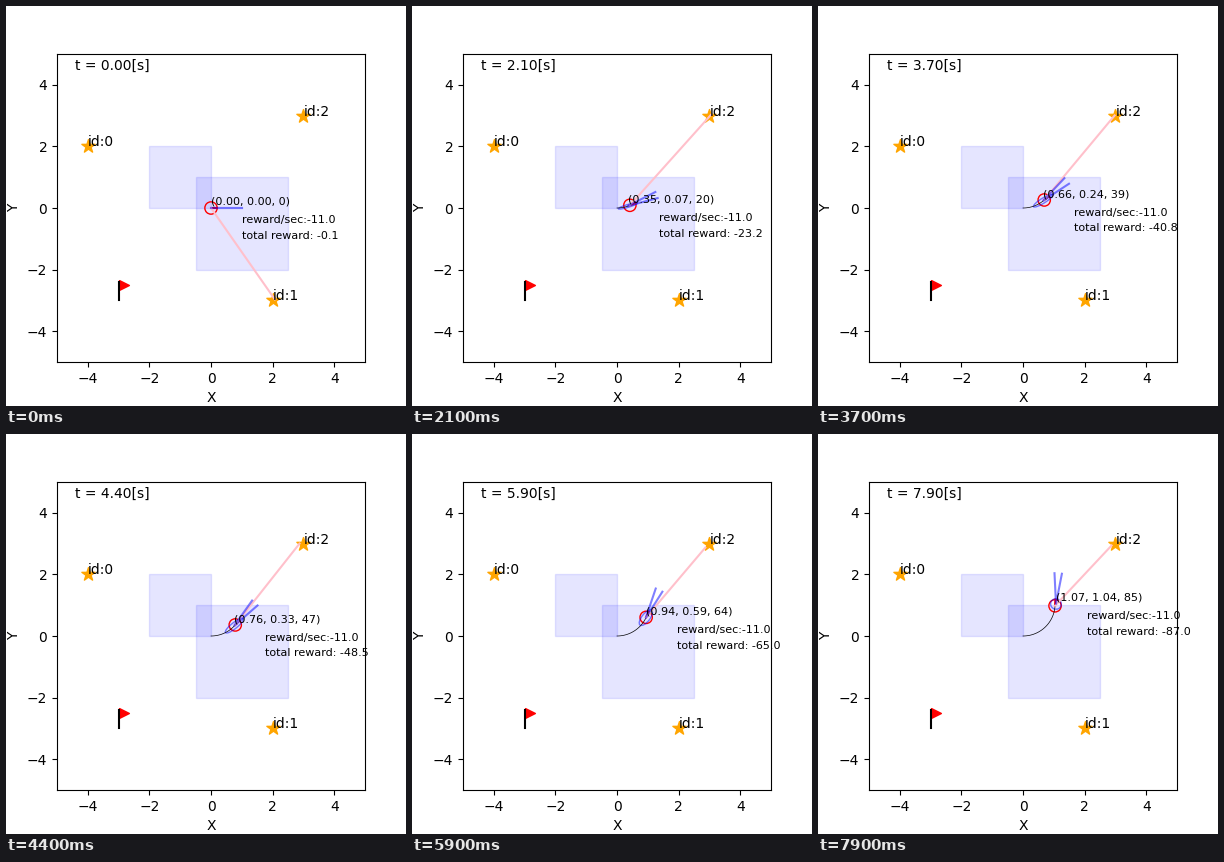
Recreate the animation shown at these times as a matplotlib script. Size 400 by 400 pixels, loop 8000 ms.

```python
import math
import random

import numpy as np
import matplotlib.pyplot as plt
from matplotlib.animation import FuncAnimation
from matplotlib.patches import Circle, Ellipse, Rectangle

STEPS, DT = 80, 0.1
SPEED, TURN = 0.2, math.radians(11)
LANDMARKS = [(-4, 2), (2, -3), (3, 3)]
PUDDLES = [((-2, 0), 2, 2), ((-0.5, -2), 3, 3)]
VIEW, MISS_RATE = math.pi / 3, 0.175


def arc(t, shift, lean=1.0):
    """Point on the planned arc, moved by shift along a share of its heading."""
    r, a = SPEED / TURN, TURN * t
    return (r * np.sin(a) + shift * np.cos(lean * a),
            r * (1 - np.cos(a)) + shift * np.sin(lean * a))


def robot(t):
    return arc(t, 0.013 * np.sin(np.pi * t / 7))


def belief(t):
    """Estimated x, y and heading: drifts until the first correction at 2.4 s."""
    if t < 2.4:
        slip, lag = -0.028 * t, 1.1 * t
    else:
        slip, lag = 0.0066 * (t - 4.2) ** 2 - 0.028, 0.28 + 0.3 * abs(t - 5.3)
    x, y = arc(t, slip, lean=0.7)
    return x, y, math.degrees(TURN * t) - lag


def sight_all():
    """Noisy sightings for each step; some landmarks in view are overlooked."""
    luck, noise = random.Random(42), random.Random(3)
    steps = []
    for n in range(STEPS):
        t, seen = n * DT, []
        x, y = robot(t)
        for mx, my in LANDMARKS:
            angle = math.atan2(my - y, mx - x)
            if abs(angle - TURN * t) > VIEW or luck.random() < MISS_RATE:
                continue
            dist = math.hypot(mx - x, my - y) * noise.gauss(1, 0.05)
            angle += noise.gauss(0, math.pi / 180)
            seen.append((x + dist * math.cos(angle), y + dist * math.sin(angle)))
        steps.append(seen)
    return steps


sightings = sight_all()

fig = plt.figure(figsize=(4, 4), dpi=100)
ax = fig.add_subplot(111)
ax.set_aspect("equal")
ax.set_xlim(-5, 5)
ax.set_ylim(-5, 5)
ax.set_xlabel("X", fontsize=10)
ax.set_ylabel("Y", fontsize=10)

for corner, w, h in PUDDLES:
    ax.add_patch(Rectangle(corner, w, h, color="blue", alpha=0.1))
for i, (x, y) in enumerate(LANDMARKS):
    ax.scatter(x, y, s=100, marker="*", color="orange")
    ax.text(x, y, f"id:{i}", fontsize=10)
ax.scatter(-2.84, -2.5, s=50, marker=">", color="red")
ax.plot([-3, -3], [-3, -2.4], color="black")

clock = ax.text(-4.4, 4.5, "", fontsize=10)
nose, = ax.plot([], [], color="red")
body = ax.add_patch(Circle((0, 0), 0.2, fill=False, color="red"))
trail, = ax.plot([], [], linewidth=0.5, color="black")
rays = [ax.plot([], [], color="pink")[0] for _ in LANDMARKS]
cloud = ax.add_patch(Ellipse((0, 0), 0, 0, fill=False, color="blue", alpha=0.5))
fan, = ax.plot([], [], color="blue", alpha=0.5)
pose_text, rate_text, total_text = (ax.text(0, 0, "", fontsize=8) for _ in range(3))


def label(text, x, y, s):
    text.set_position((x, y))
    text.set_text(s)


def update(n):
    t = n * DT
    clock.set_text(f"t = {t:.2f}[s]")

    x, y = robot(t)
    body.center = x, y
    nose.set_data([x, x + 0.2 * math.cos(TURN * t)], [y, y + 0.2 * math.sin(TURN * t)])
    trail.set_data(*robot(np.arange(n + 1) * DT))
    for ray in rays:
        ray.set_data([], [])
    for ray, (px, py) in zip(rays, sightings[n]):
        ray.set_data([x, px], [y, py])

    mx, my, deg = belief(t)
    cloud.set_center((mx, my))
    cloud.width = 0.74 * math.sin(math.pi * (t / 10) ** 0.7)
    cloud.height = 0.044 * t
    cloud.angle = 0.8 * deg
    spread = 6.9 * (1 - math.exp(-t))
    edges = np.radians([deg - spread, deg + spread])
    (x1, x2), (y1, y2) = mx + np.cos(edges), my + np.sin(edges)
    fan.set_data([x1, mx, x2], [y1, my, y2])

    label(pose_text, mx, my + 0.1, f"({mx:.2f}, {my:.2f}, {int(deg)})")
    label(rate_text, mx + 1, my - 0.5, "reward/sec:-11.0")
    label(total_text, mx + 1, my - 1, f"total reward: {-0.1 - 1.1 * n:.1f}")


anim = FuncAnimation(fig, update, frames=STEPS, init_func=lambda: update(0),
                     interval=100, repeat=True, repeat_delay=0)
plt.show()
```
